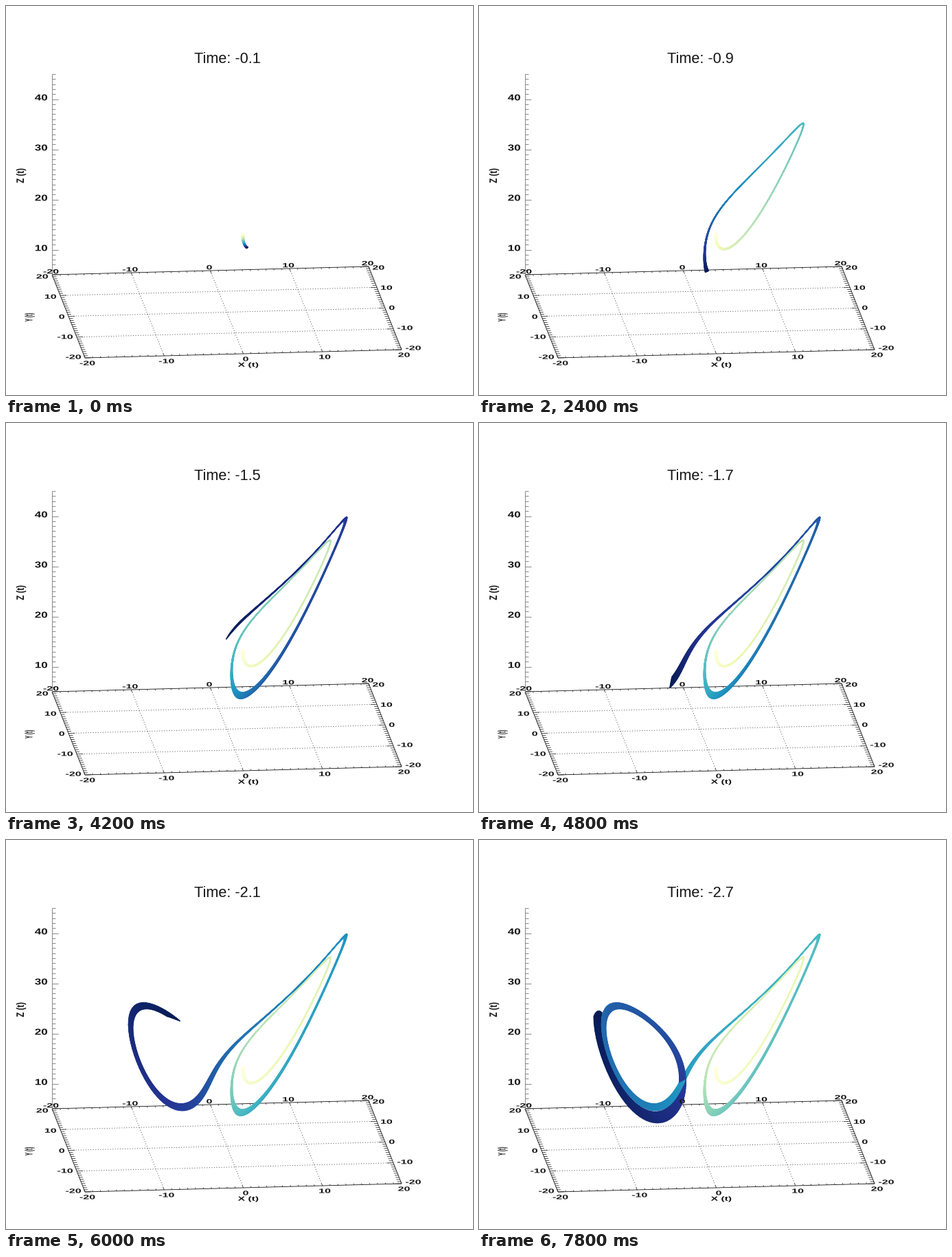
A matplotlib script for the animation above (8000 ms loop, 680 by 566 pixels).

```python
import numpy as np
import matplotlib.pyplot as plt
from matplotlib.animation import FuncAnimation
from matplotlib.collections import LineCollection
from matplotlib.patches import PathPatch
from matplotlib.textpath import TextPath
from matplotlib.transforms import Affine2D

W, H, DPI = 680, 566, 100
PX = 72 / DPI
SUB = 12                     # integration steps per time label
DT = 0.1 / SUB
LAST = 27
MEMBERS = 24
INK = "#141414"

# Where the ribbon's leading and trailing edge end at a few time labels
LEADING = {0: 347 + 332j, 5: 427 + 216j, 9: 334 + 383j, 13: 480 + 155j,
           17: 279 + 386j, 21: 252 + 262j, 27: 170 + 253j}
TRAILING = {0: 343 + 332j, 5: 430 + 212j, 9: 327 + 386j, 13: 493 + 144j,
            17: 284 + 358j, 21: 210 + 251j}


def project(x, y, z):
    """Oblique projection to pixels, as complex numbers."""
    px = 321.5 + 11.525 * x - 1.2 * y
    py = 445.5 - 0.3 * x - 3.025 * y - 7.3 * (z - 5)
    return px + 1j * py


def lorenz(s):
    x, y, z = s
    return np.array([10 * (y - x), x * (28 - z) - y, x * y - 8 / 3 * z])


def integrate(s):
    """Runge-Kutta paths of all start columns, shape (time, column)."""
    paths = [project(*s)]
    for _ in range(LAST * SUB):
        k1 = lorenz(s)
        k2 = lorenz(s + DT / 2 * k1)
        k3 = lorenz(s + DT / 2 * k2)
        k4 = lorenz(s + DT * k3)
        s = s + DT / 6 * (k1 + 2 * k2 + 2 * k3 + k4)
        paths.append(project(*s))
    return np.array(paths)


def find_start(marks, rng):
    """Shrinking random search for the start that passes the marks."""
    best, size = np.array([2.3, 2.3, 19.5]), np.array([0.9, 2.5, 2.5])
    for _ in range(14):
        tries = best[:, None] + size[:, None] * rng.uniform(-1, 1, (3, 2000))
        tries[:, 0] = best
        paths = integrate(tries)
        misfit = sum(abs(paths[t * SUB] - p) for t, p in marks.items())
        best = tries[:, misfit.argmin()]
        size = size * 0.6
    return best


def make_segments():
    rng = np.random.default_rng(4)
    lead, trail = find_start(LEADING, rng), find_start(TRAILING, rng)
    mix = np.linspace(0, 1, MEMBERS)
    paths = integrate(np.outer(trail, 1 - mix) + np.outer(lead, mix)).T
    points = np.stack([paths.real, paths.imag], axis=-1)
    return np.stack([points[:, :-1], points[:, 1:]], axis=2)


fig = plt.figure(figsize=(W / DPI, H / DPI), dpi=DPI, facecolor="white")
ax = fig.add_axes([0, 0, 1, 1])
ax.set_xlim(0, W)
ax.set_ylim(H, 0)
ax.axis("off")


def lines(pairs, color=INK, width=0.85, **style):
    segs = [[(p.real, p.imag) for p in pair] for pair in pairs]
    ax.add_collection(LineCollection(segs, colors=color, linewidths=width * PX,
                                     zorder=1, **style))


def label(text, x, y, size, scale, rot=0, align=0.5):
    """Text lying in a projected plane; align is the fraction left of x."""
    path = TextPath((0, 0), text, size=size,
                    prop={"family": "Liberation Sans", "weight": "bold"})
    box = path.get_extents()
    place = (Affine2D().translate(-box.x0 - align * box.width,
                                  -box.y0 - box.height / 2)
             .rotate_deg(rot).scale(scale[0], -scale[1]).translate(x, y))
    ax.add_patch(PathPatch(place.transform_path(path), fc=INK, lw=0, zorder=4))


def draw_axes():
    def floor(x, y):
        return project(x, y, 5)

    def post(z):
        return project(-20, 20, z)

    corners = [floor(*c) for c in ((-20, 20), (20, 20), (20, -20), (-20, -20))]
    lines(zip(corners, corners[1:] + corners[:1]))
    for u in range(-20, 21):
        major = u % 10 == 0
        for edge in (-20, 20):
            inward = -np.sign(edge) * (0.8 if major else 0.45)
            lines([(floor(u, edge), floor(u, edge + 1.5 * inward)),
                   (floor(edge, u), floor(edge + inward, u))], width=0.7)
    for u in (-10, 0, 10):
        lines([(floor(u, -20), floor(u, 20)), (floor(-20, u), floor(20, u))],
              "#333333", linestyles=[(0, (1.2, 3))])

    lines([(post(5), post(45))], "#777777")
    lines([(post(z), post(z) + (9 if z % 10 == 0 else 4.5))
           for z in range(5, 46)], "#777777")

    flat = (1.78, 1)
    for u in range(-20, 21, 10):
        back, front = floor(u, 20), floor(u, -20)
        left, right = floor(-20, u), floor(20, u)
        label(str(u), back.real - 1.5, back.imag - 4.8, 9, flat)
        label(str(u), front.real + 3.5, front.imag + 7.5, 9, flat)
        drop = (20 - u) * 0.1
        label(str(u), left.real - 6, left.imag + 2.5 - drop, 9, flat, align=1)
        label(str(u), right.real + 6, right.imag + 1.5 - drop, 9, flat, align=0)
    for z in range(10, 41, 10):
        label(str(z), 60, post(z).imag - 2.5, 12.5, (1.36, 1), align=1)
    label("X (t)", 352.5, 522.5, 8.8, flat)
    label("Y (t)", 34.5, 453, 15.5, (1, 0.42), rot=90)
    label("Z (t)", 22, 247, 15.5, (1, 0.74), rot=90)


draw_axes()
segments = make_segments()
ribbon = LineCollection([], linewidths=1.4 * PX, capstyle="round", zorder=3)
ax.add_collection(ribbon)
title = ax.text(274.5, 83, "", family="Liberation Sans", size=21.7 * PX,
                color=INK, va="baseline")
cmap = plt.get_cmap("YlGnBu")


def update(i):
    step = i // 3 + 1
    n = step * SUB
    ribbon.set_segments(segments[:, :n].reshape(-1, 2, 2))
    ribbon.set_color(np.tile(cmap(np.linspace(0, 1, n)), (MEMBERS, 1)))
    title.set_text(f"Time: -{step / 10:.1f}")
    return ribbon, title


anim = FuncAnimation(fig, update, frames=80, interval=100, repeat=True,
                     repeat_delay=0, blit=False)
plt.show()
```
